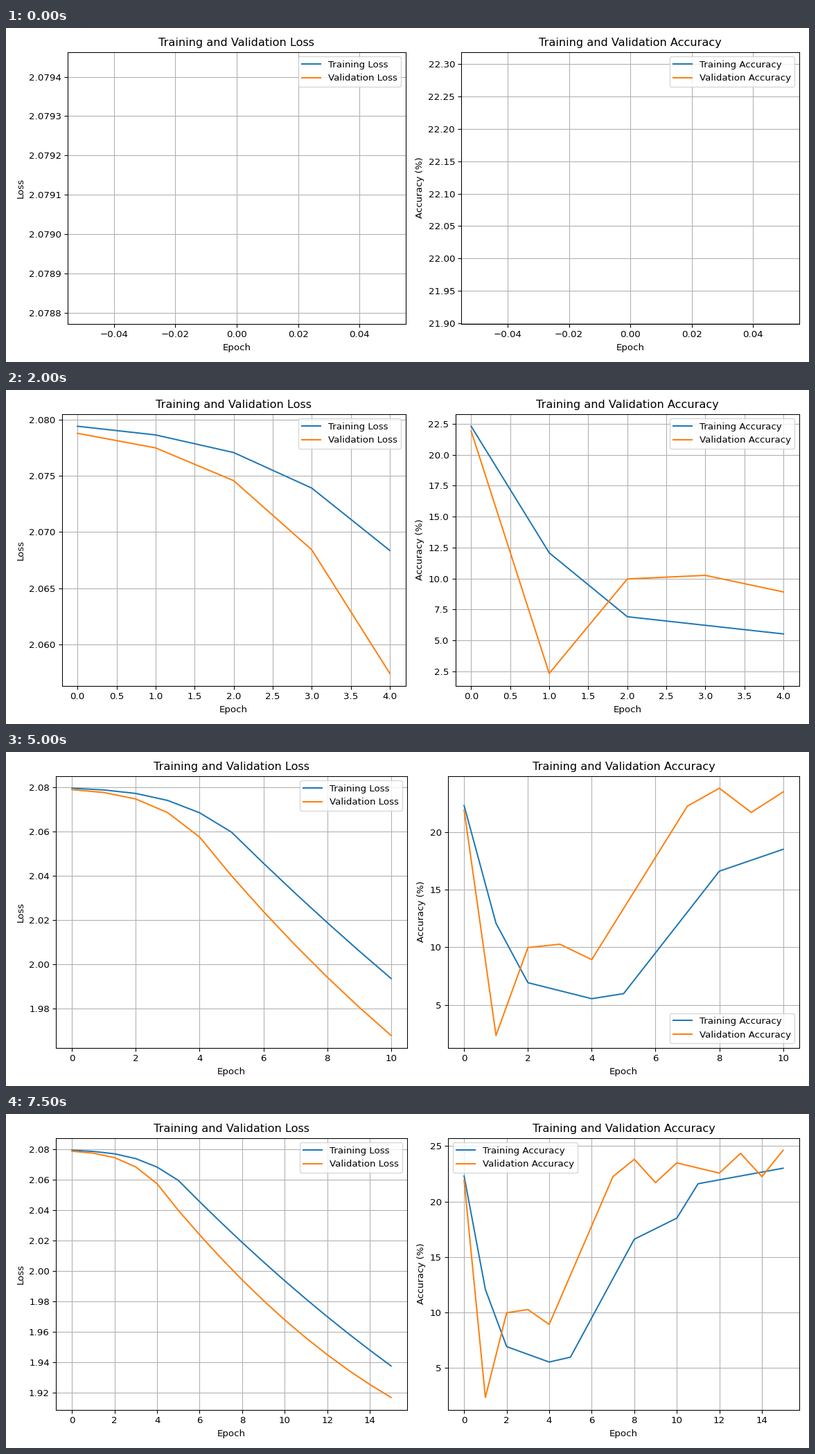
Write a matplotlib script that moves like this. It is 1159 px wide and 483 px high and loops after 8 s.

```python
import numpy as np
import matplotlib.pyplot as plt
from matplotlib.animation import FuncAnimation

EPOCHS = 16
INTERVAL = 500
WARMUP = 5

epochs = np.arange(EPOCHS)


def loss_curve(start, linear, cubic, slope, slowdown):
    """Cubic fall during the warm-up, then a steady descent that slows down."""
    early = np.minimum(epochs, WARMUP)
    late = np.maximum(epochs - WARMUP, 0)
    fall = linear * early + cubic * early**3
    return start - fall - slope * late + slowdown * late**2


def through(*points):
    return np.interp(epochs, *zip(*points))


train_loss = loss_curve(2.079432, 6.4e-4, 1.33e-4, 0.0142, 2e-4)
val_loss = loss_curve(2.078803, 1.03e-3, 2.7e-4, 0.0165, 4.2e-4)

train_acc = through((0, 22.3), (1, 12.08), (2, 6.92), (4, 5.53), (5, 5.97),
                    (8, 16.6), (10, 18.5), (11, 21.6), (15, 23))

# Validation accuracy climbs to a plateau, then swings around it.
past = epochs - 8
plateau = 22.6 + 0.14 * past + 1.2 * np.cos(2 * np.pi * past / 2.4)
climb = through((0, 21.918), (1, 2.34), (2, 9.97), (3, 10.26), (4, 8.92), (7, 22.25))
val_acc = np.where(past < 0, climb, plateau)

fig, (loss_ax, acc_ax) = plt.subplots(1, 2, figsize=(12, 5), dpi=96.6)


def draw_panel(ax, metric, unit, train, val, count):
    ax.clear()
    ax.plot(epochs[:count], train[:count], label=f"Training {metric}")
    ax.plot(epochs[:count], val[:count], label=f"Validation {metric}")
    ax.set_title(f"Training and Validation {metric}")
    ax.set_xlabel("Epoch")
    ax.set_ylabel(metric + unit)
    ax.legend()
    ax.grid(True)


def update(epoch):
    draw_panel(loss_ax, "Loss", "", train_loss, val_loss, epoch + 1)
    draw_panel(acc_ax, "Accuracy", " (%)", train_acc, val_acc, epoch + 1)
    fig.tight_layout()


anim = FuncAnimation(fig, update, frames=EPOCHS, init_func=lambda: None,
                     interval=INTERVAL, repeat=True, repeat_delay=0)
plt.show()
```
